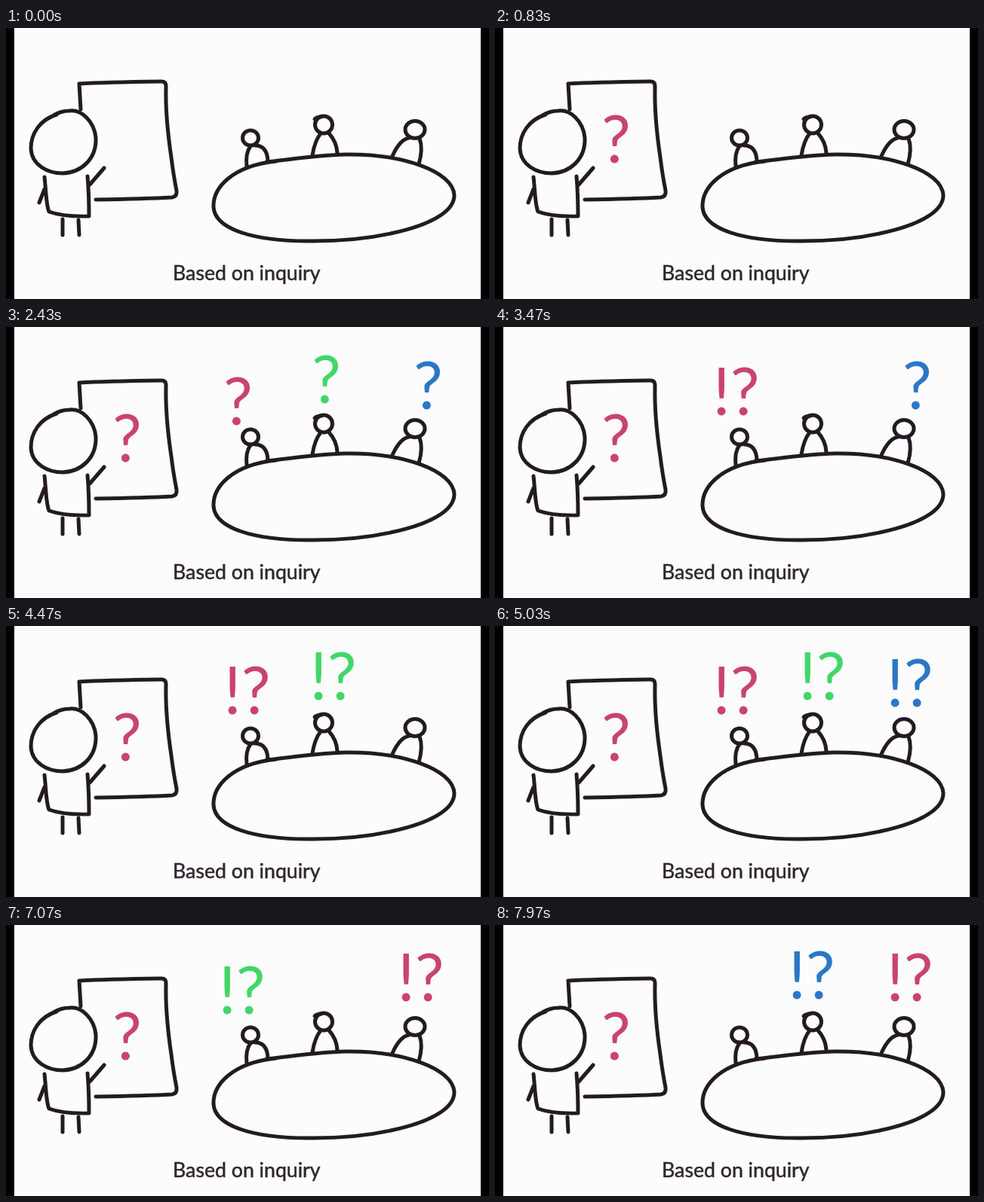
Write an HTML page that moves like this. It is 640x360 px and loops after 8000 ms.

```html
<!DOCTYPE html>
<html lang="en">
<head>
<meta charset="utf-8">
<title>Based on inquiry</title>
<style>
  html, body { margin: 0; width: 100%; height: 100%; overflow: hidden; background: #000; }
  svg { display: block; width: 100vw; height: 100vh; }
  text { font-family: Lato, "Open Sans", sans-serif; }
  .ink { fill: none; stroke: #231b21; stroke-width: 5; stroke-linecap: round; stroke-linejoin: round; }
  #caption { fill: #30262e; stroke: #30262e; stroke-width: .5; }
</style>
</head>
<body>
<svg id="stage" viewBox="0 0 640 360">
  <rect x="11" width="618" height="360" fill="#fcfcfd"/>
  <g class="ink">
    <!-- board -->
    <path d="M99 108L97 74Q130 72 206 71Q212 71 212 77C211 112 215 145 219 172Q222 196 226 216Q227 224 220 225Q185 227 119 228"/>
    <!-- presenter -->
    <path d="M67 115C45 122 33 140 33 160C34 182 55 193 75 193C100 192 120 174 119 146C117 124 100 108 84 110Q73 110 63 116"/>
    <path d="M51 198C53 215 53 235 57 244Q76 251 110 250Q110 220 108 197M51 214L44 232M111 208L130 186M75 254V275M96 255L97 275"/>
    <!-- table -->
    <path d="M358 177C300 183 274 212 275 238C277 268 330 283 400 283C490 284 594 262 594 222C592 190 525 167 450 168C410 169 375 175 345 178"/>
    <!-- listeners -->
    <ellipse cx="324" cy="146" rx="10.5" ry="10"/>
    <path d="M319 184Q317 166 324 157M330 156Q346 156 347 177"/>
    <ellipse cx="421" cy="128.500" rx="11.500" ry="11.500"/>
    <path d="M409 121Q412 118 418 118M406 169Q409 150 417 140M428 140Q438 151 439 166"/>
    <ellipse cx="542" cy="135" rx="13" ry="11.500"/>
    <path d="M512 170Q522 148 534 146M548 147Q553 160 547 181"/>
  </g>
  <text id="caption">Based on inquiry</text>
</svg>
<script>
const LOOP = 8000, FADE = 140, MARK_H = 65;
const RED = '#c9436f', GREEN = '#42d668', BLUE = '#2b77c6';

// text, colour, ink left, ink top, fade-in start, cut-out time
const marks = [
  ['?',  RED,   144.5, 114.5,  560, LOOP],
  ['?',  RED,   291.5,  65.5, 1210, 2770],
  ['?',  GREEN, 408.5,  36.5, 1880, 3370],
  ['?',  BLUE,  543.5,  44.5, 2290, 4470],
  ['!?', RED,   294.5,  52.5, 3050, 5470],
  ['!?', GREEN, 408.5,  33.5, 3950, 5470],
  ['!?', BLUE,  524.5,  42.5, 4880, 6070],
  ['!?', RED,   524.5,  36.5, 6360, LOOP],
  ['!?', GREEN, 287.5,  53.5, 6660, 7730],
  ['!?', BLUE,  394.5,  33.5, 7120, LOOP]
];

const stage = document.getElementById('stage');
const pen = document.createElement('canvas').getContext('2d');
pen.font = '100px Lato, "Open Sans", sans-serif';

function inkBox(str) {
  const m = pen.measureText(str);
  return {
    left: m.actualBoundingBoxLeft,
    width: m.actualBoundingBoxLeft + m.actualBoundingBoxRight,
    up: m.actualBoundingBoxAscent,
    height: m.actualBoundingBoxAscent + m.actualBoundingBoxDescent
  };
}

function put(el, x, y, scale) {
  el.setAttribute('x', x);
  el.setAttribute('y', y);
  el.setAttribute('font-size', 100 * scale);
}

function addMark([str, color, left, top, start, end]) {
  const el = document.createElementNS(stage.namespaceURI, 'text');
  const box = inkBox(str), scale = MARK_H / box.height;
  el.textContent = str;
  el.setAttribute('fill', color);
  put(el, left + box.left * scale, top + box.up * scale, scale);
  stage.append(el);

  const frames = [[0, 0], [start, 0], [start + FADE, 1], [end, 1]];
  if (end < LOOP) frames.push([end, 0], [LOOP, 0]);
  el.animate(
    frames.map(([t, opacity]) => ({ offset: t / LOOP, opacity })),
    { duration: LOOP, iterations: Infinity }
  );
}

const caption = document.getElementById('caption');
const capBox = inkBox(caption.textContent), capScale = 193 / capBox.width;
put(caption, 223.5 + capBox.left * capScale, 334.5, capScale);

marks.forEach(addMark);
</script>
</body>
</html>
```
